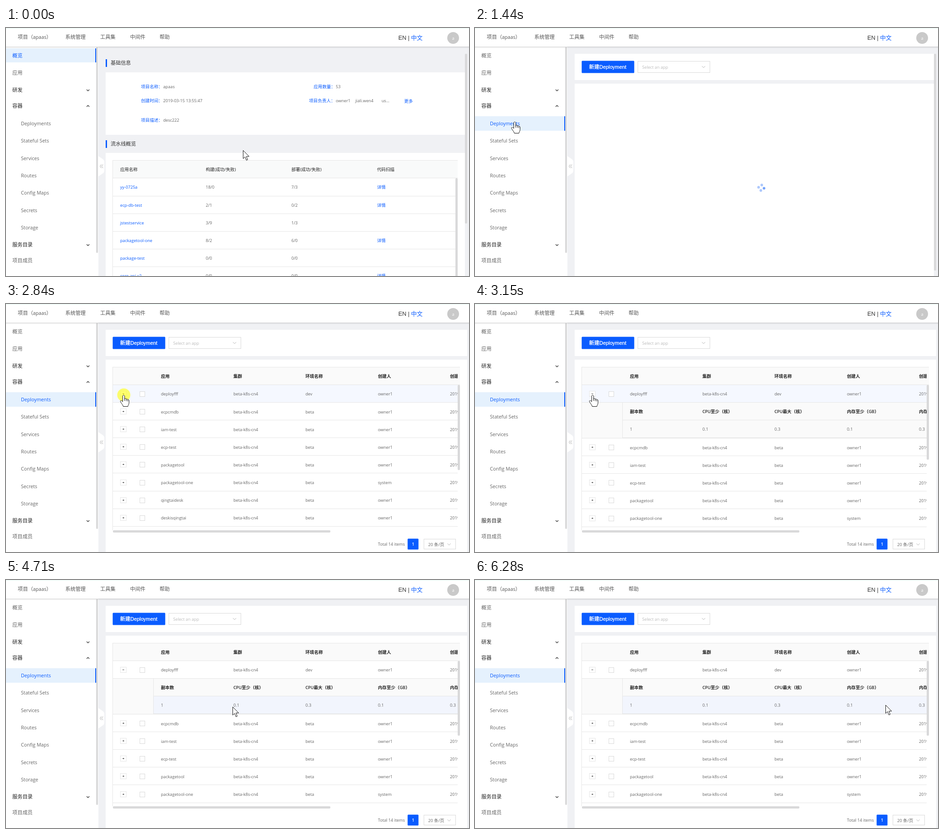
Write an HTML page that moves like this. It is 1022 px wide and 548 px high and loops after 6.68 s.

```html
<!DOCTYPE html>
<html lang="zh-CN">
<head>
<meta charset="utf-8">
<title>Deployments</title>
<style>
html, body { margin: 0; width: 100%; height: 100%; overflow: hidden; background: #f0f1f4; }
svg { display: block; width: 100vw; height: 100vh; font-family: "Open Sans", "Noto Sans CJK SC", "Noto Sans CJK", sans-serif; }
text { white-space: pre; }
rect { shape-rendering: crispEdges; }
rect.soft { shape-rendering: auto; }
.arial { font-family: "Liberation Sans", "Noto Sans CJK SC", "Noto Sans CJK", sans-serif; }
</style>
</head>
<body>
<svg id="stage" viewBox="0 0 1022 548"></svg>
<script>
const LOOP = 6680;
const BLUE = '#0a5cff', GREY = '#666', DARK = '#333', LINE = '#e6e6e6';
const SMALL = 9.6, NORMAL = 11.2;

// ---- drawing helpers ----
// Latin letters are set slightly smaller than the Chinese ones; cy is the middle of the line.
const text = (x, cy, str, fill = GREY, size = SMALL, attrs = '') => {
  const body = str.replace(/[\u3000-\u9fff\uff00-\uffef]+/g, run => `<tspan font-size="${size}">${run}</tspan>`);
  return `<text x="${x}" y="${cy + size * .36}" fill="${fill}" font-size="${size * .955}" ${attrs}>${body}</text>`;
};
const rect = (x, y, x2, y2, fill, attrs = '') =>
  `<rect x="${x}" y="${y}" width="${x2 - x}" height="${y2 - y}" fill="${fill}" ${attrs}/>`;
const button = (x, y, x2, y2) => rect(x - .5, y - .5, x2 + .5, y2 + .5, BLUE, 'class="soft" rx="1.5"');
const frame = (x, y, x2, y2, stroke = '#d9d9d9') =>
  rect(x + .5, y + .5, x2 - .5, y2 - .5, '#fff', `stroke="${stroke}" rx="1"`);
const hline = (x, x2, y) => rect(x, y, x2, y + 1, LINE);
const bar = (x, y, x2, y2) => rect(x, y, x2, y2, '#d9d9da', 'class="soft" rx="2"');
const chevron = (x, y, w, h, stroke, width) =>
  `<path d="M${x - w} ${y - h / 2}l${w} ${h} ${w} ${-h}" fill="none" stroke="${stroke}" stroke-width="${width}"/>`;
const group = (id, body, attrs = '') => `<g id="${id}" ${attrs}>${body}</g>`;
const MEDIUM = 'font-weight="500"', BOLD = 'font-weight="600"';

// ---- page frame ----
function header() {
  const nav = [[26, '项目（apaas）'], [131, '系统管理'], [208, '工具集'], [274, '中间件'], [339, '帮助']];
  return [.13, .08, .05, .02].map((o, i) => rect(0, 41 + i, 1022, 42 + i, '#000', `opacity="${o}"`)).join('') +
    rect(0, 0, 1022, 41, '#fff') + rect(0, 0, 1022, 1, '#e4faf4') +
    nav.map(([x, s]) => text(x, 20, s, '#555', NORMAL)).join('') +
    text(866, 21, 'EN | ', DARK, 13.4, 'class="arial"') + text(894, 21, '中文', BLUE, 12.8) +
    '<circle cx="987" cy="22" r="13" fill="#c9c9c9"/>' +
    text(987, 22.5, 'a', '#fff', SMALL, 'text-anchor="middle"');
}

const active = (id, y, y2) => group(id, rect(0, y, 197, y2, '#e5f1fd') + rect(197, y, 199, y2, BLUE));

function sidebar() {
  const items = ['Deployments', 'Stateful Sets', 'Services', 'Routes', 'Config Maps', 'Secrets', 'Storage'];
  const heads = [[137, '研发', 4], [172, '容器', -4], [479, '服务目录', 4]];
  return rect(0, 41, 204, 548, '#fff') +
    active('activeHome', 45, 76) + active('activeDeploy', 195, 227) + bar(199, 42, 203, 497) +
    text(14, 61, '概览', GREY, NORMAL, 'id="homeItem"') + text(14, 99, '应用', GREY, NORMAL) +
    heads.map(([y, s, h]) => text(14, y, s, '#222', NORMAL, MEDIUM) + chevron(181, y + .5, 3, h * .8, '#444', 1.4)).join('') +
    items.map((s, i) => text(33, 211 + i * 38.35, s, GREY, NORMAL, i ? '' : 'id="deployItem"')).join('') +
    text(14, 514, '项目成员', GREY, NORMAL) +
    '<path d="M204 283L214 290Q217 292 217 295V316Q217 319 214 321L204 328Z" fill="#fff"/>' +
    '<path d="M210.5 301.5l-3 4 3 4M214 301.5l-3 4 3 4" fill="none" stroke="#aaa"/>';
}

// ---- pages ----
function home() {
  const title = (y, s) => rect(220, y - 8, 223, y + 9, BLUE) + text(231, y, s, DARK, NORMAL, MEDIUM);
  const pair = (x, y, label, vx, value) => text(x, y, label + '：', BLUE) + text(vx, y, value);
  const columns = [252, 441, 630, 819];
  const rows = [
    ['yy-0725a', '18/0', '7/3', '详情'], ['ecp-db-test', '2/1', '0/2', '详情'],
    ['jstestservice', '3/9', '1/3', ''], ['packagetool-one', '8/2', '6/0', '详情'],
    ['package-test', '0/0', '0/0', ''], ['core-api-v2', '0/0', '0/0', '详情']];
  return title(77, '基础信息') + rect(220, 98, 1013, 236, '#fff') +
    pair(298, 130, '项目名称', 347, 'apaas') + pair(298, 161, '创建时间', 347, '2019-03-15 13:55:47') +
    pair(298, 204, '项目描述', 347, 'desc222') + pair(679, 130, '应用数量', 728, '53') +
    pair(669, 161, '项目负责人', 728, 'owner1') + text(771, 161, 'jiali.wen4') + text(829, 161, 'us...') +
    text(879, 162, '更多', BLUE) +
    title(256, '流水线概览') + rect(220, 276, 1013, 548, '#fff') +
    rect(236, 293, 997, 332, '#f9fafa') + hline(236, 997, 292) + hline(236, 997, 331) + rect(235, 292, 236, 548, LINE) +
    ['应用名称', '构建(成功/失败)', '部署(成功/失败)', '代码扫描'].map((s, i) => text(columns[i], 313, s, '#222', SMALL, MEDIUM)).join('') +
    rows.map((row, r) => hline(236, 992, Math.round(371 + r * 39.1)) +
      row.map((s, i) => text(columns[i], 352 + r * 39.1, s, i % 3 ? GREY : BLUE)).join('')).join('') +
    bar(992, 332, 997, 552) + bar(1013, 57, 1018, 432);
}

const toolbar = right => rect(220, 57, right, 115, '#fff') + rect(220, 123, right, 548, '#fff') +
  button(236, 73, 351, 99) +
  `<text x="252" y="90" font-size="${NORMAL}" fill="#fff" stroke="#fff" stroke-width=".3" class="arial">新建Deployment</text>` +
  frame(359, 73, 519, 99) + text(369, 87, 'Select an app', '#bbb') + chevron(504.5, 86, 3.5, 4, '#bbb', 1);

function loading() {
  const dots = [[1, -6], [-6, -1], [-1, 6], [6, 1]];
  return toolbar(1013) + bar(1013, 57, 1018, 536) +
    group('spinner', dots.map(([x, y], i) =>
      `<circle cx="${x}" cy="${y}" r="2.9" fill="${i === 3 ? '#74a3fb' : '#adc8fc'}"/>`).join(''));
}

function list(expanded) {
  const columns = [342, 502, 661, 821, 980];
  const cells = (values, y, fill, attrs) => values.map((s, i) => text(columns[i], y, s, fill, SMALL, attrs)).join('');
  const names = ['deployfff', 'ecpcmdb', 'iam-test', 'ecp-test', 'packagetool', 'packagetool-one', 'qingtaidesk', 'deskisqingtai'];
  const rows = names.slice(0, expanded ? 6 : 8).map((name, r) => {
    const y = 199 + r * 39.1 + (expanded && r ? 79 : 0), mid = Math.round(y);
    const hover = r < 2 ? rect(236, mid - 20, 997, mid + 18, '#f5f8ff', `class="hover${r}"`) : '';
    const open = expanded && !r;
    return hover + hline(236, 997, mid + 18) +
      frame(252, mid - 7, 266, mid + 6, LINE) +
      rect(257, mid - 1, 261, mid, '#555') + (open ? '' : rect(258.5, mid - 2, 259.5, mid + 1, '#555')) +
      frame(295, mid - 6, 307, mid + 6) +
      cells([name, 'beta-k8s-cn4', r ? 'beta' : 'dev', r === 5 ? 'system' : 'owner1', '2019-08-01'], y);
  }).join('');
  const detail = expanded ? rect(236, 218, 997, 296, '#fafafa') +
    rect(326, 257, 997, 296, '#f2f5fd', 'class="hoverDetail"') +
    rect(325, 218, 326, 296, LINE) + hline(326, 997, 256) + hline(236, 997, 296) + rect(326, 295, 997, 296, LINE) +
    cells(['副本数', 'CPU至少（核）', 'CPU最大（核）', '内存至少（GB）', '内存最大（GB）'], 238, '#222', BOLD) +
    cells(['1', '0.1', '0.3', '0.1', '0.3'], 277) : '';
  return toolbar(1018) +
    rect(236, 139, 1002, 178, '#fafafa') + hline(236, 1002, 139) + hline(236, 1002, 178) + rect(235, 139, 236, 500, LINE) +
    group('', cells(['应用', '集群', '环境名称', '创建人', '创建时间'], 159.5, '#222', BOLD) + rows + detail, 'clip-path="url(#tableClip)"') +
    bar(997, 179, 1002, expanded ? 344 : 367) + bar(236, 500, 716, 505) +
    text(821, 531, 'Total 14 items') + button(887, 519, 910, 542) +
    text(898.5, 531, '1', '#fff', SMALL, BOLD + ' text-anchor="middle"') +
    frame(922, 519, 993, 542) + text(932, 531.5, '20 条/页') + chevron(978, 531, 3.5, 4, '#bbb', 1);
}

const pointer = `
  <circle id="click" r="14.5" fill="#ffff14" opacity=".62"/>
  <g id="cursor" fill="#fff" stroke="#111" stroke-linejoin="round">
    <path id="arrow" d="M.5 .5V18.6L4.6 14.8 7.6 22.2 10.4 21 7.6 13.8H13.6Z"/>
    <path id="hand" d="M-2.4 15V2.3C-2.4 0 1.8 0 1.8 2.3V9C1.8 7.2 5.4 7.2 5.4 9.4V10.2C5.4 8.4 8.6 8.4 8.6 10.6V11.4C8.6 9.8 11.5 9.8 11.5 12V17.5C11.5 21.5 9.3 22 9 25.5H-1.2C-1.6 22-5.5 19-7.4 14.6C-8.6 12-4.5 11.2-2.4 15ZM1.8 9V13M5.4 10V13.5M8.6 11.4V14"/>
  </g>`;

document.getElementById('stage').innerHTML =
  '<clipPath id="tableClip"><path d="M235 139H997V500H235Z"/></clipPath>' +
  group('home', home()) + group('loading', loading()) + group('list', list(false)) + group('expanded', list(true)) +
  sidebar() + header() + pointer;

// ---- motion ----
const $ = id => document.getElementById(id);
const show = (id, on) => $(id).style.display = on ? '' : 'none';
const fadeAll = (name, opacity) => document.querySelectorAll('.' + name).forEach(el => el.style.opacity = opacity);
const clamp = v => Math.max(0, Math.min(1, v));
const smooth = u => u * u * (3 - 2 * u);
const linear = u => u;

// Pointer moves in discrete steps along curves: first step, last step, count, end, bend, easing.
const moves = [
  [70, 660, 9, [89, 205], [250, 170], smooth],
  [760, 760, 1, [88, 207], [88, 206], linear],
  [1930, 2140, 4, [256, 234], [172, 222], smooth],
  [2300, 2690, 6, [260, 201], [261, 218], smooth],
  [3570, 4160, 9, [366, 279], [300, 250], smooth],
  [4250, 4860, 9, [542, 279], [446, 282], linear],
  [4940, 5580, 9, [758, 276], [650, 264.5], linear],
  [5650, 6280, 9, [906, 276], [832, 290], linear]
];

function pointerAt(t) {
  let from = [523, 270];
  for (const [start, end, count, to, bend, ease] of moves) {
    if (t < start) break;
    const step = count > 1 ? Math.floor((t - start) / (end - start) * (count - 1) + 1e-6) + 1 : 1;
    const u = ease(clamp(step / count)), v = 1 - u;
    from = from.map((p, i) => v * v * p + 2 * u * v * bend[i] + u * u * to[i]);
  }
  return from;
}

function draw(t) {
  const [x, y] = pointerAt(t);
  const onMenu = x < 200;
  const onToggle = Math.abs(x - 259) < 8 && (Math.abs(y - 199) < 8 || Math.abs(y - 238) < 8);
  const place = `translate(${Math.round(x)} ${Math.round(y)})`;
  $('cursor').setAttribute('transform', place);
  $('click').setAttribute('transform', place);
  show('hand', onMenu || onToggle);
  show('arrow', !onMenu && !onToggle);
  show('click', t >= 980 && t < 1130 || t >= 2840 && t < 3000);

  const opened = t >= 1210;
  show('home', !opened);
  show('loading', opened && t < 1520);
  show('list', t >= 1520 && t < 3150);
  show('expanded', t >= 3150);
  show('activeHome', !opened);
  show('activeDeploy', opened);
  $('homeItem').setAttribute('fill', opened ? GREY : BLUE);
  $('deployItem').setAttribute('fill', opened || onMenu ? BLUE : GREY);
  $('spinner').setAttribute('transform', `translate(632 353) rotate(${(t - 1440) * .3})`);

  const fade = (on, off) => clamp((t - on) / 300) - clamp((t - off) / 300);
  fadeAll('hover0', fade(2480, 3720));
  fadeAll('hover1', fade(2100, 2480));
  fadeAll('hoverDetail', fade(3900, 1e5));
}

function tick() {
  draw(performance.now() % LOOP);
  requestAnimationFrame(tick);
}
tick();
</script>
</body>
</html>
```
